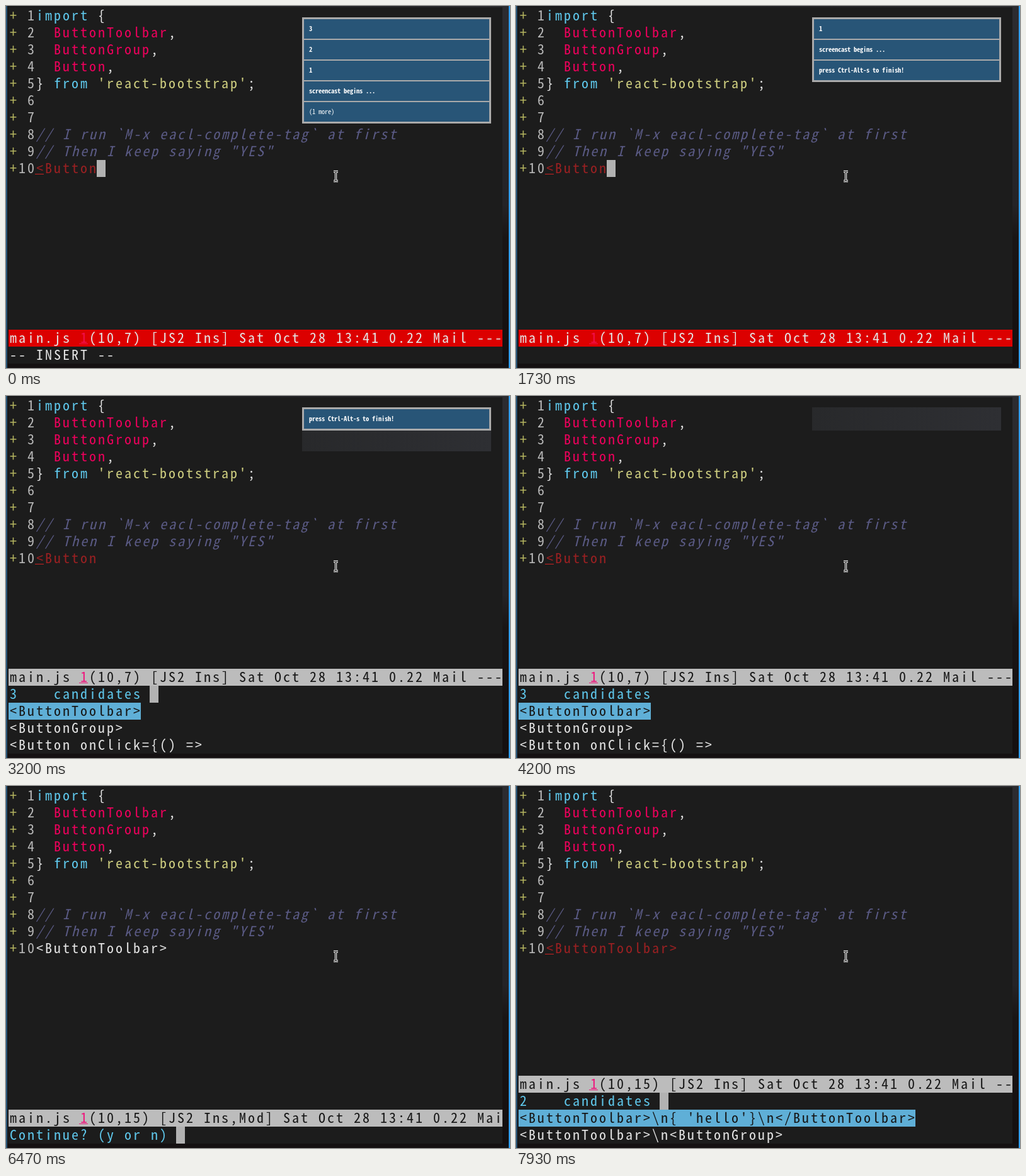
Animation, 800 px wide and 576 px high, one loop 8000 ms. Source, as an HTML page:

```html
<!DOCTYPE html>
<html lang="en">
<head>
<meta charset="utf-8">
<title>Editor tag completion</title>
<style>
  html, body { margin: 0; width: 100%; height: 100%; overflow: hidden; background: #151314; }
  svg { display: block; }
  text {
    font-family: "Noto Sans Mono CJK JP", "Noto Sans Mono CJK SC", "Noto Sans Mono", monospace;
    font-size: 22px; text-anchor: middle; white-space: pre;
  }
  .note { font-size: 10.5px; }
</style>
</head>
<body>
<svg id="stage" width="800" height="576" viewBox="0 0 800 576">
  <defs>
    <linearGradient id="wall" x2="0" y2="1">
      <stop offset="0" stop-color="#2c2c30"/>
      <stop offset=".55" stop-color="#242326"/>
      <stop offset=".64" stop-color="#191515"/>
      <stop offset="1" stop-color="#140f0f"/>
    </linearGradient>
    <linearGradient id="sky">
      <stop offset="0" stop-color="#151517"/>
      <stop offset="1" stop-color="#2c2c30"/>
    </linearGradient>
    <linearGradient id="ghost">
      <stop offset="0" stop-color="#28292b"/>
      <stop offset="1" stop-color="#2e2f33"/>
    </linearGradient>
    <path id="beam" d="M520 263.5H522.5L523.5 264.5L524.5 263.5H527M523.5 264.5V277.5M520 278.5H522.5L523.5 277.5L524.5 278.5H527"/>
  </defs>
  <rect width="800" height="576" fill="url(#wall)"/>
  <rect width="800" height="2" fill="url(#sky)"/>
  <rect y="569" width="800" height="7" fill="#151112"/>
  <rect width="2" height="576" fill="#285577"/>
  <rect x="2" y="2" width="2" height="567" fill="#171718"/>
  <rect x="798" width="2" height="576" fill="#2e9ef4"/>
  <rect x="4" y="2" width="784" height="567" fill="#1c1c1c"/>
  <g id="code"></g>
  <g id="live"></g>
  <g id="notes"></g>
  <g fill="none">
    <use href="#beam" stroke="#f4f4f4" stroke-width="3.4"/>
    <use href="#beam" stroke="#1c1c1c" stroke-width="1.2"/>
  </g>
</svg>
<script>
const LOOP = 8000, CELL = 14, ROW = 27, LEFT = 4, TOP = 2;
const C = {
  fg: '#e4e4e4', pink: '#ee005c', blue: '#5fc8ec', str: '#cfcf80', plus: '#b4b45f',
  num: '#b8b8b8', note: '#5b5b86', err: '#9a2022', gray: '#bcbcbc', red: '#dc0000',
  pick: '#5fafd7', cursor: '#b2b2b2', ink: '#161616'
};
const $ = id => document.getElementById(id);
const esc = s => s.replace(/&/g, '&amp;').replace(/</g, '&lt;').replace(/>/g, '&gt;');
const box = (x, y, w, h, fill) => `<rect x="${x}" y="${y}" width="${w}" height="${h}" fill="${fill}"/>`;
const colX = c => LEFT + c * CELL;
const rowY = r => TOP + r * ROW;

// Each character is centred in its grid cell.
function glyphs(s, x, y, pitch, attrs) {
  const xs = [...s].map((_, i) => x + (i + .5) * pitch).join(' ');
  return `<text x="${xs}" y="${y}" ${attrs}>${esc(s)}</text>`;
}
const put = (col, row, s, fill, extra = '') =>
  glyphs(s, colX(col) + .6, rowY(row) + 21, CELL, `fill="${fill}" ${extra}`);
const cells = (col, row, n, fill) => box(colX(col), rowY(row), n * CELL, ROW, fill);
const underline = (col, row, fill) => box(colX(col), rowY(row) + 22, CELL, 1, fill);

function drawCode() {
  let out = '';
  for (let i = 0; i < 10; i++) {
    out += put(0, i, '+', C.plus) + put(1, i, String(i + 1).padStart(2), C.num);
  }
  const runs = [
    [3, 0, 'import', C.blue], [10, 0, '{', C.fg],
    [5, 1, 'ButtonToolbar', C.pink], [18, 1, ',', C.fg],
    [5, 2, 'ButtonGroup', C.pink], [16, 2, ',', C.fg],
    [5, 3, 'Button', C.pink], [11, 3, ',', C.fg],
    [3, 4, '}', C.fg], [5, 4, 'from', C.blue],
    [10, 4, "'react-bootstrap'", C.str], [27, 4, ';', C.fg]
  ];
  for (const r of runs) out += put(...r);
  const italic = 'font-style="italic"';
  out += put(3, 7, '// I run `M-x eacl-complete-tag` at first', C.note, italic);
  out += put(3, 8, '// Then I keep saying "YES"', C.note, italic);
  return out;
}

function modeLine(row, pos, flags, active) {
  const s = `main.js  (${pos}) [JS2 ${flags}] Sat Oct 28 13:41 0.22 Mail ---`.slice(0, 56);
  const tag = active ? '#f0104c' : '#f0147c';
  return cells(0, row, 56, active ? C.red : C.gray) +
    put(0, row, s, active ? C.fg : C.ink) + put(8, row, '1', tag) + underline(8, row, tag);
}

function tagLine(s, bad) {
  return put(3, 9, s, bad ? C.err : C.fg) + (bad ? underline(3, 9, '#c22') : '');
}

// First item is highlighted.
function candidates(row, items) {
  let out = put(0, row, items.length + '    candidates', C.blue);
  items.forEach((s, i) => {
    if (!i) out += cells(0, row + 1, s.length, C.pick);
    out += put(0, row + 1 + i, s, i ? C.fg : C.ink);
  });
  return out;
}

const scenes = {
  insert: () => tagLine('<Button', true) + modeLine(19, '10,7', 'Ins', true) + put(0, 20, '-- INSERT --', C.fg),
  quiet: () => tagLine('<Button', true) + modeLine(19, '10,7', 'Ins', true),
  choose: () => tagLine('<Button', true) + modeLine(16, '10,7', 'Ins', false) +
    candidates(17, ['<ButtonToolbar>', '<ButtonGroup>', '<Button onClick={() =>']),
  ask: (bad, flags) => tagLine('<ButtonToolbar>', bad) + modeLine(19, '10,15', flags, false) +
    put(0, 20, 'Continue? (y or n)', C.blue),
  again: () => tagLine('<ButtonToolbar>', true) + modeLine(17, '10,15', 'Ins', false) +
    candidates(18, ["<ButtonToolbar>\\n{ 'hello'}\\n</ButtonToolbar>", '<ButtonToolbar>\\n<ButtonGroup>'])
};

// [start, scene, arguments]
const sceneSteps = [
  [0, 'insert'], [1730, 'quiet'], [2000, 'choose'], [6470, 'ask', false, 'Ins,Mod'],
  [6930, 'ask', true, 'Ins,Mod'], [7470, 'ask', true, 'Ins'], [7870, 'again']
];
// [start, column, row]; no cell means hidden
const cursorSteps = [
  [0, 10, 9], [270], [800, 10, 9], [2000, 16, 17], [2670], [3200, 16, 17], [3730],
  [4270, 16, 17], [4730], [5270, 16, 17], [5730], [6270, 16, 17], [6470, 19, 20], [7870, 16, 18]
];
const begin = 'screencast begins ...', finish = 'press Ctrl-Alt-s to finish!';
// [start, messages, height in rows still uncovered below]
const noteSteps = [
  [0, ['3', '2', '1', begin, '(1 more)'], 0],
  [1200, ['1', begin, finish], 5], [1270, ['1', begin, finish], 0],
  [2200, [begin, finish], 3], [2270, [begin, finish], 0],
  [3200, [finish], 2], [3270, [finish], 0],
  [4200, [], 1], [4270, [], 0]
];

function drawNotes(list, ghostRows) {
  let out = ghostRows ? box(470, 18, 300, ghostRows * 33 + 4, 'url(#ghost)') : '';
  if (list.length) out += box(470, 18, 300, list.length * 33 + 4, '#aaaaaa');
  list.forEach((s, i) => {
    const y = 18 + i * 33, weight = s[0] === '(' ? 400 : 700;
    out += box(473, y + 3, 294, 31, '#285577') +
      glyphs(s, 481, y + 22, 5, `class="note" fill="#fff" font-weight="${weight}"`);
  });
  return out;
}

const indexAt = (steps, t) => steps.findLastIndex(s => s[0] <= t);
let shown = '';

function render(t) {
  const a = indexAt(sceneSteps, t), b = indexAt(cursorSteps, t), c = indexAt(noteSteps, t);
  const key = [a, b, c].join();
  if (key === shown) return;
  shown = key;
  const [, name, ...args] = sceneSteps[a];
  const [, col, row] = cursorSteps[b];
  const [, list, ghostRows] = noteSteps[c];
  $('live').innerHTML = scenes[name](...args) + (row ? cells(col, row, 1, C.cursor) : '');
  $('notes').innerHTML = drawNotes(list, ghostRows);
}

$('code').innerHTML = drawCode();
const start = performance.now();
function tick() {
  render((performance.now() - start) % LOOP);
  requestAnimationFrame(tick);
}
tick();
</script>
</body>
</html>
```
